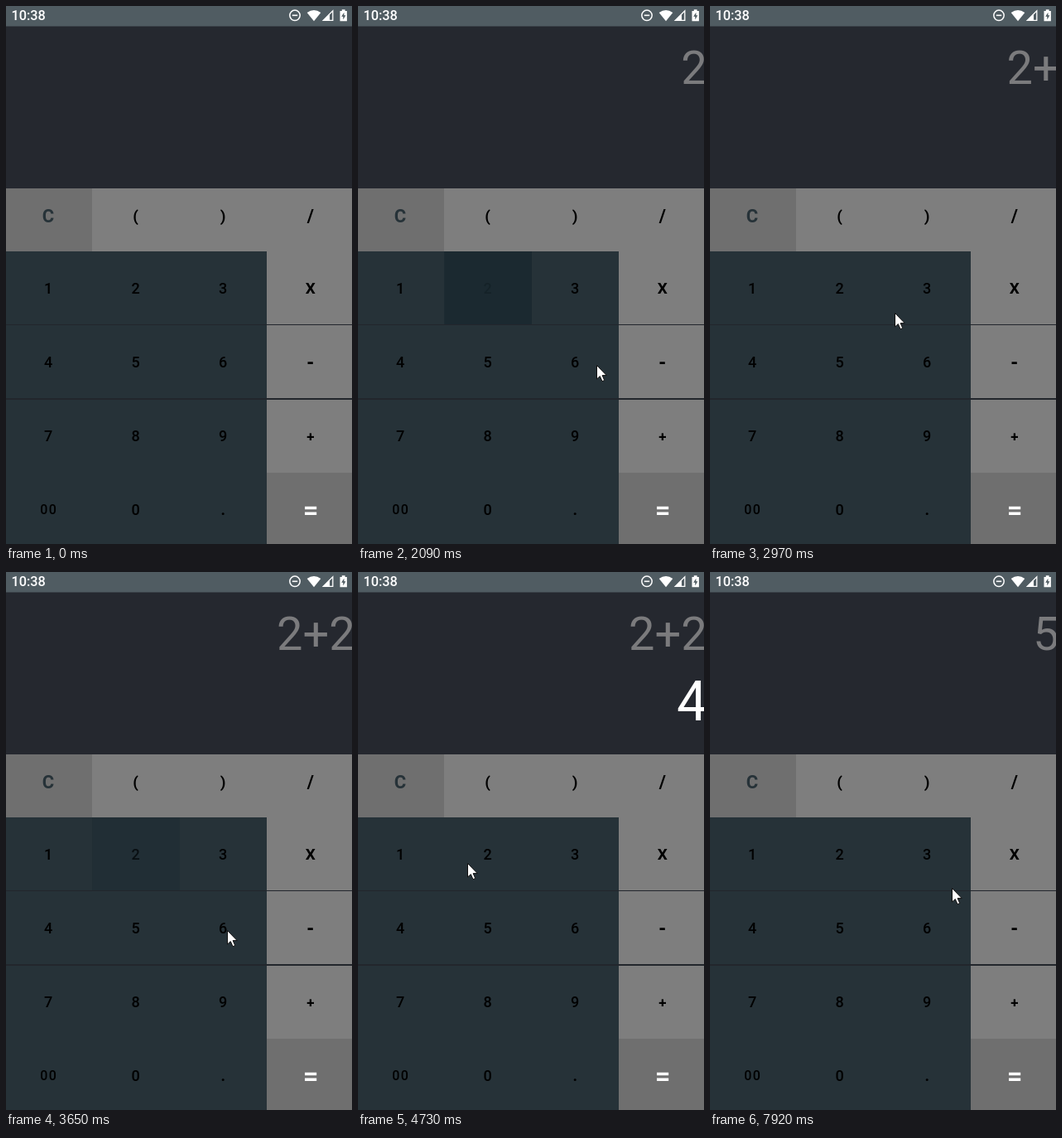
Animation, 418 px wide and 649 px high, one loop 7.99 s. Source, as an HTML page:

```html
<!DOCTYPE html>
<html lang="en">
<head>
<meta charset="utf-8">
<title>Calculator</title>
<style>
  html, body { margin: 0; width: 100%; height: 100%; overflow: hidden; background: #25282f; }
  svg { display: block; width: 418px; height: 649px; font-family: Roboto, Arial, sans-serif; }
  .label { text-anchor: middle; font-weight: 500; letter-spacing: 1.4px; }
  .op { font-weight: 700; }
  .out { text-anchor: end; font-size: 56px; fill: #7b7b7d; }
  #result { font-size: 66px; fill: #fff; }
</style>
</head>
<body>
<svg viewBox="0 0 418 649">
  <rect width="418" height="649" fill="#25282f"/>
  <rect width="418" height="24.5" fill="#505c62"/>
  <text x="6.4" y="17.3" font-size="16.3" font-weight="500" fill="#fff">10:38</text>
  <g fill="#fff">
    <circle cx="349" cy="11.3" r="6.2" fill="none" stroke="#fff" stroke-width="1.5"/>
    <rect x="345.8" y="10.5" width="6.4" height="1.6"/>
    <path d="M372 18.2 363.7 8Q372 1.8 380.3 8Z"/>
    <path d="M383.3 17.4H394.8V5.8Z" fill="none" stroke="#fff" stroke-width="1.3"/>
    <path d="M382.5 18H391V9.5Z"/>
    <path d="M403.5 6H405.8V4.3H409.6V6H411.9V18.3H403.5Z"/>
    <path d="M408.4 7.8 405.2 12.8H407.3V16.4L410.4 11.3H408.4Z" fill="#505c62"/>
  </g>
  <text id="entry" class="out" x="421.7" y="94.2"/>
  <text id="result" class="out" x="422" y="179.4"/>
  <rect y="220" width="418" height="429" fill="#7e7e7e"/>
  <rect y="220" width="104" height="76" fill="#6f6f6f"/>
  <rect x="315" y="563" width="103" height="86" fill="#6f6f6f"/>
  <rect y="296" width="315" height="353" fill="#263238"/>
  <path d="M0 384.5H418" stroke="#22262c"/>
  <path d="M0 474H418" stroke="#22262c" stroke-width="2"/>
  <g id="keys"></g>
  <path d="M361 605.5H375.2M361 612.2H375.2" stroke="#fff" stroke-width="3.5"/>
  <g id="shades"></g>
  <path id="cursor" d="M.5.5V17L4.3 13.6 7 19.7 9.7 18.5 7.1 12.6H12.2Z" fill="#fff" stroke="#111"/>
</svg>
<script>
const LOOP = 7990;
const $ = id => document.getElementById(id);

function add(parent, tag, attrs, text = '') {
  const el = document.createElementNS('http://www.w3.org/2000/svg', tag);
  for (const name in attrs) el.setAttribute(name, attrs[name]);
  el.textContent = text;
  return parent.appendChild(el);
}

// Keypad: labels and the shade that shows a press
const grid = ['C ( ) /', '1 2 3 X', '4 5 6 -', '7 8 9 +', '00 0 . ='];
const sizes = { C: 22, '/': 22, '-': 23, '+': 17, '00': 16 };
const shades = {};

grid.forEach((line, row) => line.split(' ').forEach((key, col) => {
  const digit = /\d/.test(key);
  const size = sizes[key] || (digit ? 18 : 19);
  const middle = row ? 251.2 + 89.1 * row : 253;
  if (key !== '=') {
    add($('keys'), 'text', {
      x: 51.7 + 105.6 * col, y: middle + size * 0.355, 'font-size': size,
      class: digit ? 'label' : 'label op', fill: key === 'C' ? '#263238' : '#000',
    }, key);
  }
  shades[key] = add($('shades'), 'rect', {
    x: col && 105 * col - 0.8, y: row ? 207 + 89 * row : 220,
    width: col ? 105.8 : 104, height: row ? 88 : 76,
    fill: digit ? '#192830' : '#525252', opacity: 0,
  });
}));

// Time runs in ticks of about 1/15 s; ticks 62 to 79 are cut out
const presses = [[20, '2'], [30, '+'], [42, '2'], [54, '='], [77, 'C'], [88, '5']];
const stops = [
  [0, 398, 640], [11, 142, 391], [16, 150, 350], [20, 150, 350], [22, 288, 433],
  [23, 317, 467], [28, 358, 515], [30, 358, 515], [35, 223, 370], [40, 156, 345],
  [42, 156, 345], [45, 267, 432], [51, 366, 600], [54, 366, 600], [61, 132, 351],
  [80, 137, 360], [87, 160, 428], [89, 162, 427], [92, 265, 393], [94, 292, 381],
];

function tickAt(t) {
  if (t < 7040) return Math.min(61, Math.floor((t - 590) / 67.8));
  return t < 7060 ? 80 : 81 + Math.floor((t - 7060) / 66);
}

function shadeLevel(age) {
  if (age < 0 || age > 3) return 0;
  return age < 1 ? 0.5 : age < 3 ? 0.85 : 0.38;
}

// Smooth curve through the stops that never overshoots a rest
function slope(i, axis) {
  if (!i || i === stops.length - 1) return 0;
  const rate = j => (stops[j + 1][axis] - stops[j][axis]) / (stops[j + 1][0] - stops[j][0]);
  const before = rate(i - 1), after = rate(i);
  return before * after > 0 ? 2 * before * after / (before + after) : 0;
}

function pointer(tick, axis) {
  const i = Math.max(1, stops.findIndex(stop => stop[0] >= tick));
  const a = stops[i - 1], b = stops[i];
  const span = b[0] - a[0], k = (tick - a[0]) / span, r = 1 - k;
  return r * r * (1 + 2 * k) * a[axis] + k * k * (3 - 2 * k) * b[axis]
    + span * k * r * (r * slope(i - 1, axis) - k * slope(i, axis));
}

function display(tick) {
  let entry = '', result = '';
  for (const [at, key] of presses) {
    if (at >= tick) break;
    if (key === 'C') entry = result = '';
    else if (key === '=') result = entry.split('+').reduce((sum, n) => sum + Number(n), 0);
    else entry += key;
  }
  return [entry, result];
}

function draw(t) {
  const tick = tickAt(t);
  const [entry, result] = display(tick);
  $('entry').textContent = entry;
  $('result').textContent = result;
  for (const key in shades) {
    const levels = presses.filter(p => p[1] === key).map(p => shadeLevel(tick - p[0]));
    shades[key].setAttribute('opacity', Math.max(0, ...levels));
  }
  $('cursor').style.display = tick < 0 ? 'none' : '';
  $('cursor').setAttribute('transform', `translate(${pointer(tick, 1)} ${pointer(tick, 2)})`);
}

const start = performance.now();
function loop() {
  draw((performance.now() - start) % LOOP);
  requestAnimationFrame(loop);
}
loop();
</script>
</body>
</html>
```
